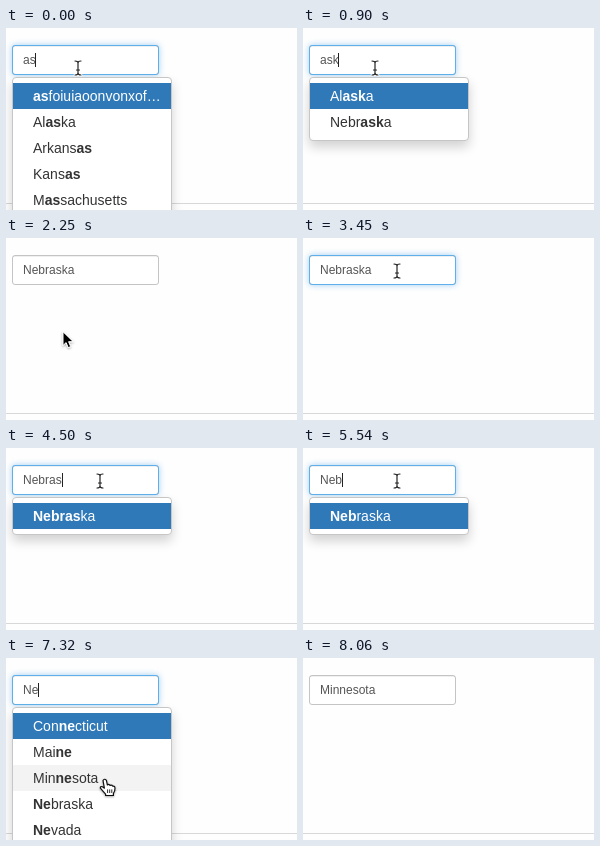
An HTML page for the animation above (8530 ms loop, 291 px wide and 182 px high).

```html
<!DOCTYPE html>
<html lang="en">
<head>
<meta charset="utf-8">
<title>Typeahead</title>
<style>
  html, body { margin: 0; width: 100%; height: 100%; overflow: hidden; background: #fefefe; }
  svg { display: block; width: 100%; height: 100%; }
  text { font-family: "Liberation Sans", Arial, sans-serif; font-size: 14px; fill: #333; }
  #value { font-size: 12px; fill: #555; }
  .on { fill: #fff; }
  .b { font-weight: bold; }
</style>
</head>
<body>
<svg viewBox="0 0 291 182">
  <defs>
    <filter id="soft" x="-20%" y="-60%" width="140%" height="220%"><feGaussianBlur stdDeviation="3"/></filter>
    <filter id="drop" filterUnits="userSpaceOnUse" x="-20" y="20" width="220" height="290"><feGaussianBlur stdDeviation="6"/></filter>
    <filter id="lift" x="-50%" y="-50%" width="200%" height="200%"><feDropShadow dx="0" dy="1" stdDeviation=".8" flood-opacity=".35"/></filter>
  </defs>
  <rect width="291" height="182" fill="#fefefe"/>
  <rect y="175" width="291" height="1" fill="#d8d8d8"/>

  <rect id="glow" x="6" y="17" width="147" height="30" rx="3" fill="#66afe9" filter="url(#soft)"/>
  <rect x="6.5" y="17.5" width="146" height="29" rx="2.5" fill="#fff" stroke="#c4c4c4"/>
  <rect x="7" y="18" width="145" height="1" opacity=".06"/>
  <rect id="focus" x="6.5" y="17.5" width="146" height="29" rx="2.5" fill="none" stroke="#5fb0ea"/>
  <text id="value" x="17" y="36"></text>
  <rect id="caret" y="25" width="1" height="14" fill="#222"/>

  <g id="menu">
    <rect id="shade" x="6" y="55" width="160" rx="4" opacity=".175" filter="url(#drop)"/>
    <rect id="panel" x="6.5" y="49.5" width="159" rx="3.5" fill="#fff" stroke="#c6c6c6"/>
    <rect x="7" y="55" width="158" height="26" fill="#2f79b9"/>
    <rect id="hover" x="7" width="158" height="26" fill="#f3f3f3"/>
    <g id="items"></g>
  </g>

  <g id="pointer" stroke-linejoin="round" stroke-linecap="round">
    <g id="beam" fill="none">
      <path id="beamLine" d="M-3-7Q0-7 0-5Q0-7 3-7M0-5V5M-3 7Q0 7 0 5Q0 7 3 7M-1.5 2H1.5" stroke="#fff" stroke-width="2.6"/>
      <use href="#beamLine" id="ink"/>
      <path d="M-3-7Q0-7 0-5Q0-7 3-7M0-5V5M-3 7Q0 7 0 5Q0 7 3 7M-1.5 2H1.5" stroke="#222" stroke-width="1.2"/>
    </g>
    <path id="arrow" d="M0 0V13.5L3.1 10.6L5.2 15.6L7.7 14.6L5.6 9.7H10Z" stroke="#fff" filter="url(#lift)"/>
    <g id="hand" stroke="#111" filter="url(#lift)">
      <path d="M-2 1.6Q-.6-1 1.4 1.4L2.4 6Q4 4.6 5 6.4Q6.8 5.4 7.8 7.2Q10 6.8 10 9.2Q10 12.6 8.4 14.4V16.5H.6V15.2Q-1.6 12.8-4.6 9.2Q-5 7-2.6 7.8L-.6 9.2Z" fill="#fff" stroke-width="1.2"/>
      <path d="M2.6 10.8V13.6M4.7 10.8V13.6M6.8 10.8V13.6" fill="none" stroke-width=".9"/>
    </g>
  </g>
</svg>
<script>
const LOOP = 8530, TOP = 55, ROW = 26;
const names = ['asfoiuiaoonvonxof…', 'Alaska', 'Arkansas', 'Connecticut', 'Kansas',
  'Maine', 'Massachusetts', 'Minnesota', 'Nebraska', 'Nevada', 'New Hampshire'];

// text: field value, query: open menu filter, caret: x or 0, focus: 0..1, at: pointer hotspot
const typed = (text, caret) => ({ text, query: text, caret });
const at = (x, y, more) => ({ at: [x, y], ...more });
const steps = [
  [0, { ...typed('as', 29), focus: 1, at: [72, 40] }],
  [300, { caret: 0 }],
  [750, { text: 'ask', caret: 35 }],
  [900, { query: 'ask' }],
  [1350, at(71, 43, { caret: 0 })],
  [1500, at(64, 72)],
  [1650, at(55, 100)],
  [1800, at(56, 98)],
  [1950, at(57, 95)],
  [2100, at(57, 94, { text: 'Nebraska', query: '', focus: .5 })],
  [2250, { focus: 0 }],
  [2550, at(60, 89)],
  [2700, at(76, 65)],
  [2850, at(91, 38)],
  [3000, at(94, 33, { focus: .5, caret: 69 })],
  [3150, { focus: 1 }],
  [3450, { caret: 0 }],
  [3600, typed('Nebrask', 62)],
  [4050, { caret: 0 }],
  [4500, typed('Nebras', 56)],
  [4790, typed('Nebra', 50)],
  [5240, typed('Nebr', 43)],
  [5540, typed('Neb', 39)],
  [5980, typed('Ne', 32)],
  [6580, at(94, 36, { caret: 0 })],
  [6730, at(95, 50)],
  [6880, at(97, 73)],
  [7030, at(98, 98, { caret: 32 })],
  [7180, at(99, 115)],
  [7320, at(99, 121)],
  [7470, at(97, 121, { text: 'Minnesota', query: '', caret: 0, focus: 0 })],
  [7910, at(214, 161)],
  [8060, { at: null }]
];

const $ = id => document.getElementById(id);
const set = (id, key, value) => $(id).setAttribute(key, value);
const show = (id, on) => set(id, 'display', on ? 'inline' : 'none');

function make(tag, parent, attrs, text = '') {
  const el = document.createElementNS('http://www.w3.org/2000/svg', tag);
  for (const key in attrs) el.setAttribute(key, attrs[key]);
  el.textContent = text;
  return parent.appendChild(el);
}

let shownQuery = null, rows = 0;

function fillMenu(query) {
  if (query === shownQuery) return;
  shownQuery = query;
  $('items').textContent = '';
  const hits = query ? names.filter(n => n.toLowerCase().includes(query.toLowerCase())) : [];
  rows = hits.length;
  hits.forEach((name, i) => {
    const line = make('text', $('items'), { x: 27, y: TOP + 18 + i * ROW, class: i ? '' : 'on' });
    name.split(new RegExp(`(${query})`, 'i')).forEach((part, k) => {
      if (part) make('tspan', line, { class: k % 2 ? 'b' : '' }, part);
    });
  });
  const height = rows * ROW + 12;
  set('panel', 'height', height - 1);
  set('shade', 'height', height);
  show('menu', rows);
}

function drawPointer(pos) {
  show('pointer', pos);
  if (!pos) return show('hover', false);
  const [x, y] = pos;
  const row = Math.floor((y - TOP) / ROW);
  const overRow = row >= 0 && row < rows;
  const overField = y > 17 && y < 47;
  set('pointer', 'transform', `translate(${x} ${y})`);
  show('beam', overField);
  show('hand', overRow);
  show('arrow', !overField && !overRow);
  show('hover', overRow && row > 0);
  set('hover', 'y', TOP + row * ROW);
}

function draw(t) {
  const s = Object.assign({}, ...steps.filter(step => step[0] <= t).map(step => step[1]));
  if ($('value').textContent !== s.text) $('value').textContent = s.text;
  set('glow', 'opacity', s.focus * .6);
  set('focus', 'opacity', s.focus);
  show('caret', s.caret);
  set('caret', 'x', s.caret);
  fillMenu(s.query);
  drawPointer(s.at);
}

const start = performance.now();
function tick() {
  draw((performance.now() - start) % LOOP);
  requestAnimationFrame(tick);
}
tick();
</script>
</body>
</html>
```
